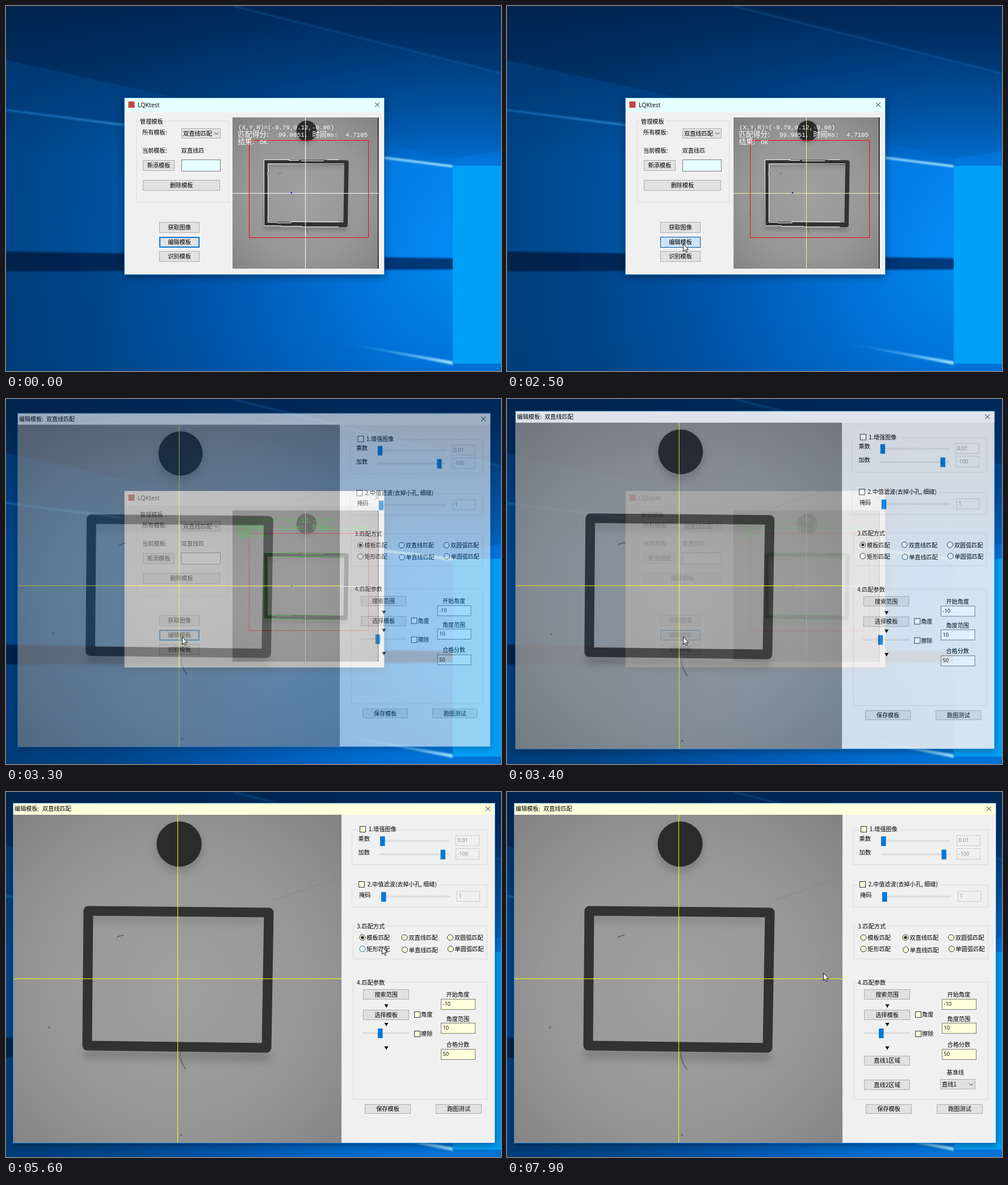
An HTML page that plays this animation: 872 by 642 pixels, repeating every 8 s.

```html
<!DOCTYPE html>
<html lang="zh-CN">
<head>
<meta charset="utf-8">
<title>模板匹配</title>
<style>
html, body { margin: 0; width: 100%; height: 100%; overflow: hidden; background: #003a7a; }
svg { display: block; width: 872px; height: 642px; --paper: #e6ffff; --mark: #fff; --cross: #fff; }
text { font: 10.2px "Noto Sans CJK SC", "Noto Sans CJK", sans-serif; fill: #000; white-space: pre; }
text.num { font: 9.3px "Open Sans", sans-serif; }
text.cap { font: 10.6px "Open Sans", sans-serif; }
text.off { fill: #838383; }
text.osd { font: 300 12.6px "Noto Sans CJK SC", "Noto Sans CJK", sans-serif; fill: var(--mark); }
text.mono { font: 10.83px "Liberation Mono", monospace; fill: var(--mark); }
.mid { text-anchor: middle; }
.face { fill: #f0f0f0; }
.paper { fill: var(--paper); }
.group { fill: none; stroke: #dcdcdc; }
.edit { fill: var(--paper); stroke: #7a7a7a; }
.edit.off { fill: #f0f0f0; stroke: #cccccc; }
.btn { fill: #e1e1e1; stroke: #adadad; }
.btn.focus { stroke: #0078d7; }
.ring { fill: none; stroke: #0078d7; }
.tick { fill: var(--paper); stroke: #333; }
.btn.hot { fill: #e5f1fb; stroke: #0078d7; }
.tick.hot { stroke: #0078d7; }
.btn.down { fill: #cce4f7; stroke: #005499; }
.track { fill: #e7e7e7; stroke: #d6d6d6; }
.thumb { fill: #0078d7; }
.line { fill: none; stroke: #222; }
.trace { fill: none; stroke: var(--mark); }
</style>
</head>
<body>
<svg id="stage" viewBox="0 0 872 642">
  <defs>
    <radialGradient id="sky" gradientUnits="userSpaceOnUse" cx="810" cy="440" r="840">
      <stop offset="0" stop-color="#008cf0"/><stop offset=".22" stop-color="#0074da"/>
      <stop offset=".5" stop-color="#0058b0"/><stop offset=".8" stop-color="#004486"/><stop offset="1" stop-color="#003c78"/>
    </radialGradient>
    <linearGradient id="dusk" x2="0" y2="1">
      <stop offset="0" stop-color="#00183a" stop-opacity=".64"/><stop offset="1" stop-color="#00183a" stop-opacity="0"/>
    </linearGradient>
    <linearGradient id="ray">
      <stop offset="0" stop-color="#0064c0" stop-opacity=".2"/><stop offset="1" stop-color="#0a8cfa" stop-opacity=".5"/>
    </linearGradient>
    <linearGradient id="edge">
      <stop offset="0" stop-color="#1e8be0" stop-opacity=".8"/><stop offset="1" stop-color="#a4e6ff"/>
    </linearGradient>
    <linearGradient id="glow">
      <stop offset="0" stop-color="#5cc8ff" stop-opacity="0"/><stop offset="1" stop-color="#a4e6ff"/>
    </linearGradient>
    <linearGradient id="band">
      <stop offset="0" stop-color="#00204a"/><stop offset="1" stop-color="#003c80"/>
    </linearGradient>
    <radialGradient id="plate" cx=".5" cy=".52" r=".75">
      <stop offset="0" stop-color="#a0a0a0"/><stop offset=".55" stop-color="#979797"/><stop offset="1" stop-color="#808080"/>
    </radialGradient>
    <filter id="soft" x="-5%" y="-20%" width="110%" height="140%"><feGaussianBlur stdDeviation="1.5"/></filter>
    <filter id="wide" x="-20%" y="-20%" width="140%" height="140%"><feGaussianBlur stdDeviation="7"/></filter>
    <!-- camera view, 578 x 577 -->
    <g id="view">
      <rect width="578" height="577" fill="url(#plate)"/>
      <circle cx="292" cy="59" r="42" fill="#555" opacity=".35" filter="url(#wide)"/>
      <path d="M130 178 437 182 437 190 130 186ZM124 412 452 417 452 434 124 428Z" fill="#555" opacity=".4" filter="url(#wide)"/>
      <circle cx="292" cy="51.5" r="39.7" fill="#2b2b2b"/>
      <path d="M132 169 450 172 446 410 130 406Z" fill="none" stroke="#323232" stroke-width="17" stroke-linejoin="round"/>
      <path d="M182 216Q188 212 194 212M293 418Q294 436 304 448" fill="none" stroke="#666" stroke-width="2"/>
      <path d="M456 151 577 110" stroke="#7c7c7c" opacity=".6"/>
      <circle cx="63" cy="374" r="2" fill="#777"/><circle cx="295" cy="563" r="1.5" fill="#555"/>
    </g>
  </defs>

  <!-- desktop -->
  <rect width="872" height="642" fill="url(#sky)"/>
  <path d="M400 0H872V118Z" fill="#002450" opacity=".35"/>
  <path d="M0 0H400L872 118V255L788 268 0 95Z" fill="#002a60" opacity=".15"/>
  <rect width="872" height="270" fill="url(#dusk)"/>
  <path d="M0 95 788 268V282L0 183Z" fill="#0058b0" opacity=".25"/>
  <path d="M0 183 787 282V446L0 432Z" fill="url(#ray)"/>
  <path d="M0 182 787 280V284L0 184Z" fill="url(#edge)" filter="url(#soft)"/>
  <path d="M400 0 872 118" stroke="#1f74c4" opacity=".5" stroke-width="2" filter="url(#soft)"/>
  <path d="M0 432 872 445V463L0 467Z" fill="url(#band)" filter="url(#soft)"/>
  <path d="M580 590 787 625V631Z" fill="url(#glow)" filter="url(#soft)"/>
  <rect x="787" y="281" width="85" height="348" fill="#009ff8"/>

  <g id="main"></g>
  <g id="dialog"></g>
  <path id="arrow" d="M.5 .5V13.6L3.5 10.8 5.6 15.5 7.6 14.6 5.6 10.1H9.6Z" fill="#fff" stroke="#000" stroke-width=".9"/>
</svg>
<script>
const $ = id => document.getElementById(id);
const stage = $('stage');

// ---- widget helpers: x, y are left and middle for text, left and top for boxes
const text = (x, y, s, cls = '') => `<text x="${x}" y="${y + 3.8}" class="${cls}">${s}</text>`;
const num = (x, y, s, cls = '') => `<text x="${x}" y="${y + 3.3}" class="num ${cls}">${s}</text>`;
const box = (x, y, r, b, cls, more = '') =>
  `<rect x="${x + .5}" y="${y + .5}" width="${r - x - 1}" height="${b - y - 1}" class="${cls}" ${more}/>`;
const fill = (x, y, r, b, cls) => `<rect x="${x}" y="${y}" width="${r - x}" height="${b - y}" class="${cls}"/>`;
const hit = (...r) => `data-hit="${r}"`;
const button = (x, y, r, b, s, more = '', cls = '') =>
  box(x, y, r, b, 'btn ' + cls, hit(x, y, r, b) + more) + text((x + r) / 2, (y + b) / 2, s, 'mid');
const combo = (x, y, r, b, s) => {
  const m = (y + b) / 2;
  return box(x, y, r, b, 'btn', hit(x, y, r, b)) + text(x + 3, m + .5, s) +
    `<path class="line" d="M${r - 11} ${m - 1.5}l3.5 3.5 3.5-3.5"/>`;
};
const edit = (x, y, r, b, s, cls = '') => box(x, y, r, b, 'edit ' + cls) + num(x + 3.5, (y + b) / 2 - .5, s, cls);
const check = (x, y, tx, s) => box(x, y, x + 11, y + 11, 'tick', hit(x, y, tx + 20, y + 11)) + text(tx, y + 5.5, s);
const radio = (x, y, s, id) =>
  `<circle cx="${x}" cy="${y}" r="5" class="tick" ${hit(x - 6, y - 7, x + 48, y + 7)}/>` +
  (id ? `<circle id="${id}" cx="${x}" cy="${y}" r="2.7" fill="#222"/>` : '') + text(x + 7.3, y + .5, s);
const slider = (x, r, y, pos) => box(x, y - 2, r, y + 1, 'track') + fill(pos, y - 8.5, pos + 8.5, y + 8.5, 'thumb');
const group = (x, y, r, b, tx, tr, s) =>
  box(x, y, r, b, 'group') + fill(tx - 2, y - 1, tr, y + 2, 'face') + (s ? text(tx, y + 1, s) : '');
const down = y => `<path d="M666.5 ${y - 3}h7l-3.5 6z"/>`;
const cross = (x, y) => `<path class="line" d="M${x - 4} ${y - 4}l8 8m0-8l-8 8"/>`;
const frame = (x, y, r, b, bar) =>
  `<rect x="${x}" y="${y + 3}" width="${r - x}" height="${b - y}" opacity=".4" filter="url(#wide)"/>` +
  box(x, y, r, b, 'face', 'stroke="#1a7fd0"') + fill(x + 1, y + 1, r - 1, bar, 'paper');

$('main').innerHTML =
  frame(208, 161, 667, 473, 187) +
  '<rect x="215.5" y="168" width="11" height="11" fill="#c8443c"/>' +
  '<text x="232" y="177.5" class="cap">LQKtest</text>' + cross(654, 173.5) +
  group(229, 202, 392, 346, 236, 278, '管理模板') +
  text(240, 222, '所有模板:') + combo(309, 215, 378, 233, '双直线匹配') +
  text(240, 254, '当前模板:') + text(308.5, 254, '双直线匹') +
  button(241, 271, 297, 290, '新添模板') + box(309, 270, 378, 291, 'edit') +
  button(241, 306, 377, 325, '删除模板') +
  button(270, 380, 341, 399, '获取图像') +
  button(270, 406, 341, 425, '编辑模板', ' id="open"', 'focus') +
  box(271, 407, 340, 424, 'ring', 'id="ring"') +
  button(270, 431, 341, 450, '识别模板') +
  '<use href="#view" transform="translate(399 196) scale(.4464 .461)"/>' +
  fill(655, 196, 656, 462, 'dark') +
  `<path d="M399 329.5H656M527.5 196V462" stroke="var(--cross)"/>
  <g class="trace">
    <path d="M454.5 386V270.5H500M498 271.5h18M520 272.5H560M566 270.5h20M461.5 380V298l-1-3 1-3V277.5H596
      M461.5 380.5H477v1h25v-2h85M455 386.5H484v1h38v1h64"/>
    <rect x="428.5" y="236.5" width="210" height="171" stroke="#f00"/>
  </g><circle cx="503" cy="328.5" r="1.3" fill="#00f"/>` +
  text(409, 213, '(X,Y,R)=(-9.79,0.12,-0.00)', 'mono') +
  text(408.5, 226.5, '匹配得分:', 'osd') + text(480, 226, '99.9851,', 'mono') +
  text(539.5, 226.5, '时间', 'osd') + text(565, 226, 'ms:', 'mono') + text(598, 226, '4.7105', 'mono') +
  text(408.5, 239.5, '结果:', 'osd') + text(447, 239, 'OK', 'mono');

$('dialog').innerHTML =
  frame(12, 19, 862, 618, 40) +
  text(15, 29.5, '编辑模板:') + text(64, 29.5, '双直线匹配') + cross(849, 29.5) +
  '<use href="#view" transform="translate(13 40)"/>' +
  '<path d="M13 328.5H591M302.5 40V617" stroke="#ff0"/>' +
  group(609, 66, 848, 128, 622, 690) + check(623, 60, 638.5, '1.增强图像') +
  text(620.5, 82, '乘数') + slider(659, 781, 86.5, 659) + edit(792, 76, 834, 95, '0.01', 'off') +
  text(620.5, 106, '加数') + slider(659, 781, 110, 765.5) + edit(792, 99, 834, 119, '-100', 'off') +
  group(609, 163, 848, 203, 619, 764) + check(621, 157, 636.5, '2.中值滤波(去掉小孔, 细缝)') +
  text(622, 181, '掩码') + slider(661, 782, 184.5, 661) + edit(794, 174, 835, 193, '1', 'off') +
  group(611, 235, 848, 294, 618, 668, '3.匹配方式') +
  radio(628, 256, '模板匹配', 'first') + radio(702, 256, '双直线匹配', 'second') + radio(782.5, 256, '双圆弧匹配') +
  radio(628, 276, '矩形匹配') + radio(702.5, 277.5, '单直线匹配') + radio(783.3, 276, '单圆弧匹配') +
  group(611, 334, 848, 541, 618, 668, '4.匹配参数') +
  button(629, 347, 710, 365, '搜索范围') + down(376.5) +
  button(629, 383, 710, 401, '选择模板') + down(409) +
  check(719, 386, 731, '角度') + slider(628, 710, 424.5, 655) + check(719, 420, 731, '擦除') + down(450.5) +
  text(775.5, 356, '开始角度') + edit(766, 364, 827, 383, '-10') +
  text(775.5, 399, '角度范围') + edit(766, 406, 827, 425, '10') +
  text(775.5, 444, '合格分数') + edit(766, 452, 827, 471, '50') +
  '<g id="extra">' +
  button(629, 464, 710, 481, '直线1区域') + button(629, 506, 710, 524, '直线2区域') +
  text(774.5, 493, '基准线') + combo(763, 505, 825, 523, '直线1') + '</g>' +
  button(632, 549, 713, 566, '保存模板') + button(757, 549, 838, 566, '跑图测试');

// ---- timeline, in ticks of 100 ms: [tick, x, y]
const path = [
  [1, 743, 88], [4, 743, 88], [6, 690, 120], [9, 450, 240], [10, 376, 249], [11, 347, 229],
  [13, 347, 229], [16, 330, 285], [17, 322, 314], [19, 306, 392], [20, 306, 392], [25, 310, 418],
  [35, 310, 418], [36, 326, 416], [39, 326, 416], [48, 632, 117], [50, 618, 150], [53, 672, 225],
  [54, 690, 254], [55, 672, 268], [56, 662, 272], [57, 660, 273], [62, 694, 259], [66, 700, 253],
  [68, 655, 285], [71, 560, 325], [73, 585, 353], [75, 688, 345], [79, 557, 318]
];
const opening = { 32: [.95, .2], 33: [.981, .62], 34: [.994, .87] };  // scale, opacity

function place(k) {
  const i = path.findIndex(p => p[0] >= k);
  if (i <= 0) return path[0].slice(1);
  const [a, ax, ay] = path[i - 1], [b, bx, by] = path[i], f = (k - a) / (b - a);
  return [Math.round(ax + (bx - ax) * f), Math.round(ay + (by - ay) * f)];
}

function setHot(root, active, x, y) {
  for (const el of root.querySelectorAll('[data-hit]')) {
    const [l, t, r, b] = el.dataset.hit.split(',').map(Number);
    el.classList.toggle('hot', active && x >= l && x < r && y >= t && y < b);
  }
}

const show = (id, on) => { $(id).style.display = on ? '' : 'none'; };
let last = -1;

function draw(k) {
  const [x, y] = place(k), chosen = k >= 64, pressed = k >= 25 && k < 32;
  const [scale, alpha] = opening[k] || [1, k > 34 ? 1 : 0];
  $('arrow').setAttribute('transform', `translate(${x} ${y})`);
  show('arrow', k >= 1);
  show('main', k < 35);
  show('dialog', alpha > 0);
  show('first', !chosen);
  show('second', chosen);
  show('extra', chosen);
  show('ring', !pressed);
  $('dialog').style.opacity = alpha;
  $('dialog').setAttribute('transform', `translate(436.5 318.5) scale(${scale}) translate(-436.5 -318.5)`);
  stage.style.setProperty('--paper', k < 32 ? '#e6ffff' : k < 35 ? '#fff' : '#ffffdc');
  stage.style.setProperty('--mark', k < 32 ? '#fff' : '#0f0');
  stage.style.setProperty('--cross', pressed ? '#f3efa0' : '#fff');
  setHot($('main'), k < 32, x, y);
  setHot($('dialog'), k >= 36, x, y);
  $('open').classList.toggle('down', pressed);
}

function tick(now) {
  const k = Math.floor(now % 8000 / 100);
  if (k !== last) draw(last = k);
  requestAnimationFrame(tick);
}
draw(0);
requestAnimationFrame(tick);
</script>
</body>
</html>
```
